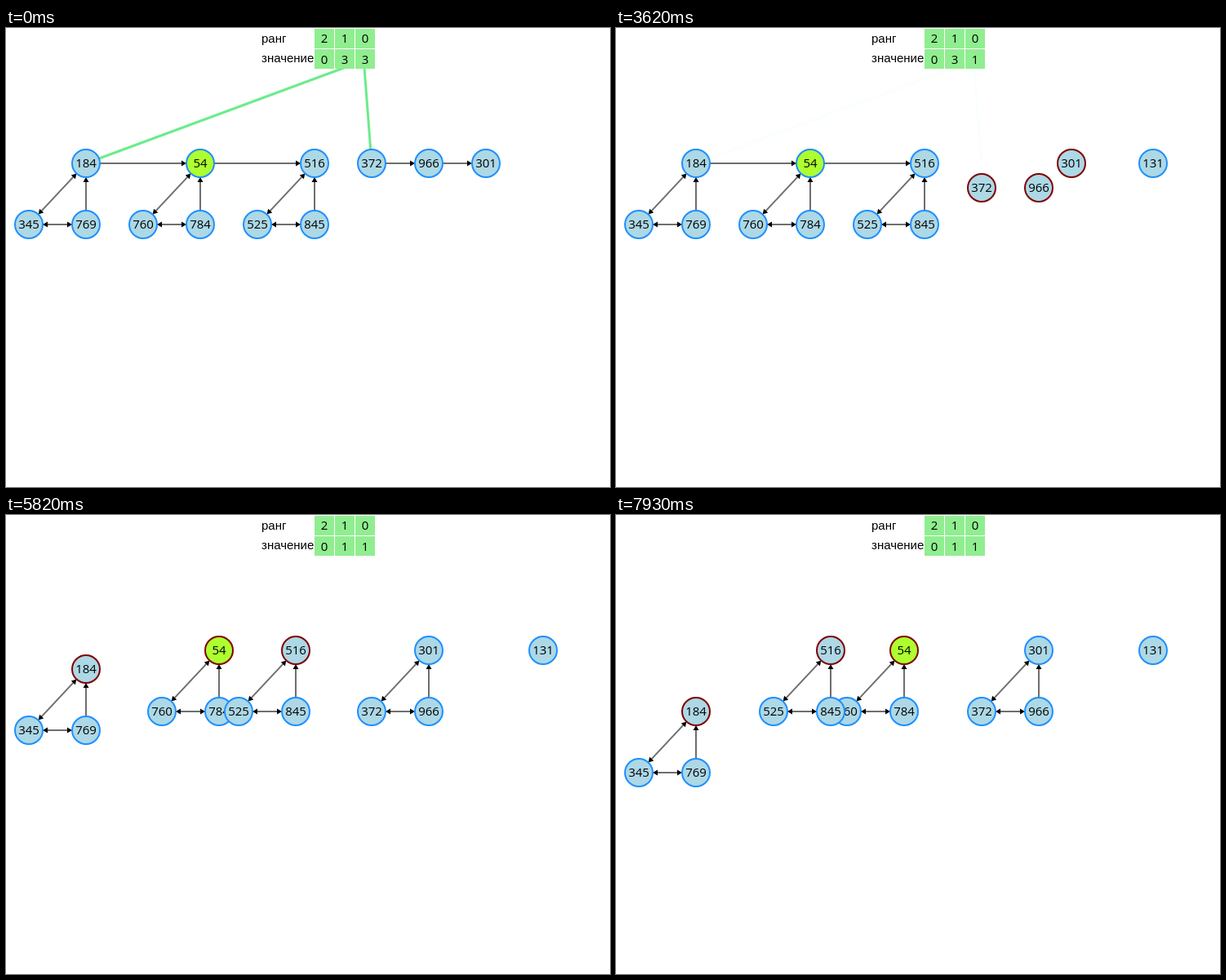
Animation, 740 px wide and 563 px high, one loop 8 s. Source, as an HTML page with a canvas:

```html
<!DOCTYPE html>
<html lang="ru">
<head>
<meta charset="utf-8">
<style>
  html, body { margin: 0; width: 100%; height: 100%; overflow: hidden; background: #fff; }
  canvas { display: block; }
</style>
</head>
<body>
<canvas id="stage" width="740" height="563"></canvas>
<script>
const ctx = document.getElementById('stage').getContext('2d');
const LOOP = 8000, RADIUS = 17;
const BLUE = '#1e90ff', MAROON = '#800000', PALE = '#add8e6', LIME = '#adff2f';

// The picture advances in uneven bursts: [first, last, number of steps]
const bursts = [
  [0, 0, 1], [2070, 2150, 2], [2380, 2460, 2], [2930, 3240, 5], [3390, 3470, 2],
  [3620, 4400, 11], [4490, 4490, 1], [4950, 5270, 5], [5420, 5820, 6], [6200, 6430, 4],
  [6580, 6900, 5], [7070, 7070, 1], [7300, 7450, 3], [7600, 7690, 2], [7840, 7930, 2]
];
const ticks = bursts.flatMap(([a, b, n]) =>
  Array.from({ length: n }, (_, i) => a + (n > 1 ? (b - a) * i / (n - 1) : 0)));
const snap = t => ticks.filter(k => k <= t + 5).pop();

// Piecewise linear value through [time, value] points
function track(t, ...points) {
  if (t <= points[0][0]) return points[0][1];
  for (let i = 1; i < points.length; i++) {
    const [a, u] = points[i - 1], [b, v] = points[i];
    if (t <= b) return u + (v - u) * (t - a) / (b - a);
  }
  return points[points.length - 1][1];
}

function withAlpha(alpha, draw) {
  if (alpha <= 0) return;
  ctx.globalAlpha = alpha;
  draw();
  ctx.globalAlpha = 1;
}

function line(x1, y1, x2, y2, color, width) {
  ctx.strokeStyle = color;
  ctx.lineWidth = width;
  ctx.beginPath();
  ctx.moveTo(x1, y1);
  ctx.lineTo(x2, y2);
  ctx.stroke();
}

function arrowHead(x, y, angle) {
  ctx.save();
  ctx.translate(x, y);
  ctx.rotate(angle);
  ctx.fillStyle = '#000';
  ctx.beginPath();
  ctx.moveTo(0, 0);
  ctx.lineTo(-6, -3.5);
  ctx.lineTo(-6, 3.5);
  ctx.fill();
  ctx.restore();
}

function edge(a, b, bothWays) {
  const angle = Math.atan2(b.y - a.y, b.x - a.x);
  const dx = Math.cos(angle), dy = Math.sin(angle);
  const start = bothWays ? RADIUS + 4 : RADIUS, end = RADIUS + 4;
  line(a.x + dx * start, a.y + dy * start, b.x - dx * end, b.y - dy * end, '#6e6e6e', 2);
  arrowHead(b.x - dx * RADIUS, b.y - dy * RADIUS, angle);
  if (bothWays) arrowHead(a.x + dx * RADIUS, a.y + dy * RADIUS, angle + Math.PI);
}

function treeEdges([top, left, right]) {
  edge(left, top, true);
  edge(left, right, true);
  edge(right, top, false);
}

function text(string, x, y, align = 'center', font = '15px "Open Sans", "Noto Sans", sans-serif') {
  ctx.font = font;
  ctx.textAlign = align;
  ctx.fillStyle = '#000';
  ctx.fillText(string, x, y);
}

function circle({ label, x, y, border = BLUE, fill = PALE }) {
  ctx.beginPath();
  ctx.arc(x, y, RADIUS, 0, 2 * Math.PI);
  ctx.fillStyle = fill;
  ctx.fill();
  ctx.strokeStyle = border;
  ctx.lineWidth = 2;
  ctx.stroke();
  text(label, x, y + 5);
}

// Three nodes: top, lower left, lower right
const tree = (labels, x, y, border, fill) => [
  { label: labels[0], x, y, border, fill },
  { label: labels[1], x: x - 70, y: y + 75 },
  { label: labels[2], x, y: y + 75 }
];

function table(values) {
  const font = '15px "Liberation Sans", Arial, sans-serif';
  text('ранг', 313, 18, 'left', font);
  text('значение', 313, 42, 'left', font);
  [[2, 1, 0], values].forEach((row, r) => row.forEach((value, c) => {
    ctx.fillStyle = '#90ee90';
    ctx.fillRect(378 + 25 * c, 1 + 25 * r, 24, 24);
    text(value, 390 + 25 * c, 18 + 26 * r);
  }));
}

function render(time) {
  const t = snap(time);
  ctx.clearRect(0, 0, 740, 563);

  const fold = track(t, [3240, 0], [3390, 21], [3470, 25], [3620, 30], [4400, 75]);
  const shift = track(t, [5270, 0], [5420, 4], [5510, 8], [5820, 23], [6200, 33], [6430, 44],
    [6580, 53], [6900, 69], [7070, 76], [7300, 91], [7450, 99], [7690, 101], [7840, 111], [7930, 115]);

  const topBorder = t >= 5420 ? MAROON : BLUE;
  const trees = [
    tree([184, 345, 769], 98, 166 + Math.min(shift, 75), topBorder),
    tree([54, 760, 784], 238 + shift, 166, topBorder, LIME),
    tree([516, 525, 845], 378 - shift, 166, topBorder)
  ];
  const border = t >= 3390 && t < 4490 ? MAROON : BLUE;
  const row = [
    { label: 301, x: 588 - Math.min(fold, 70), y: 166, border },
    { label: 372, x: 448, y: 166 + fold, border },
    { label: 966, x: 518, y: 166 + fold, border }
  ];

  // Pointers from the table to the root lists
  const pointer = track(t, [3240, 1], [3390, 0.4], [3470, 0.04]);
  withAlpha(t < 4950 ? pointer : 0, () => line(415, 48.5, 98, 166, '#6bec8c', 3));
  withAlpha(t < 4490 ? pointer : 0, () => line(439, 48.5, 448, 166, '#6bec8c', 3));

  withAlpha(track(t, [4870, 1], [5270, 0]), () => {
    edge(trees[0][0], trees[1][0]);
    edge(trees[1][0], trees[2][0]);
  });
  withAlpha(track(t, [2850, 1], [3240, 0]), () => {
    edge(row[1], row[2]);
    edge(row[2], row[0]);
  });
  trees.forEach(treeEdges);
  if (t >= 4490) treeEdges(row);

  [...trees.flat(), ...row].forEach(circle);
  withAlpha(track(t, [2000, 0], [2070, 0.15], [2460, 1]), () => circle({ label: 131, x: 658, y: 166 }));

  const rank1 = t < 4490 ? 3 : t < 4950 ? 4 : 1;
  const rank0 = t < 2460 ? 3 : t < 2930 ? 4 : 1;
  table([0, rank1, rank0]);
}

function loop() {
  render(performance.now() % LOOP);
  requestAnimationFrame(loop);
}
loop();
</script>
</body>
</html>
```
